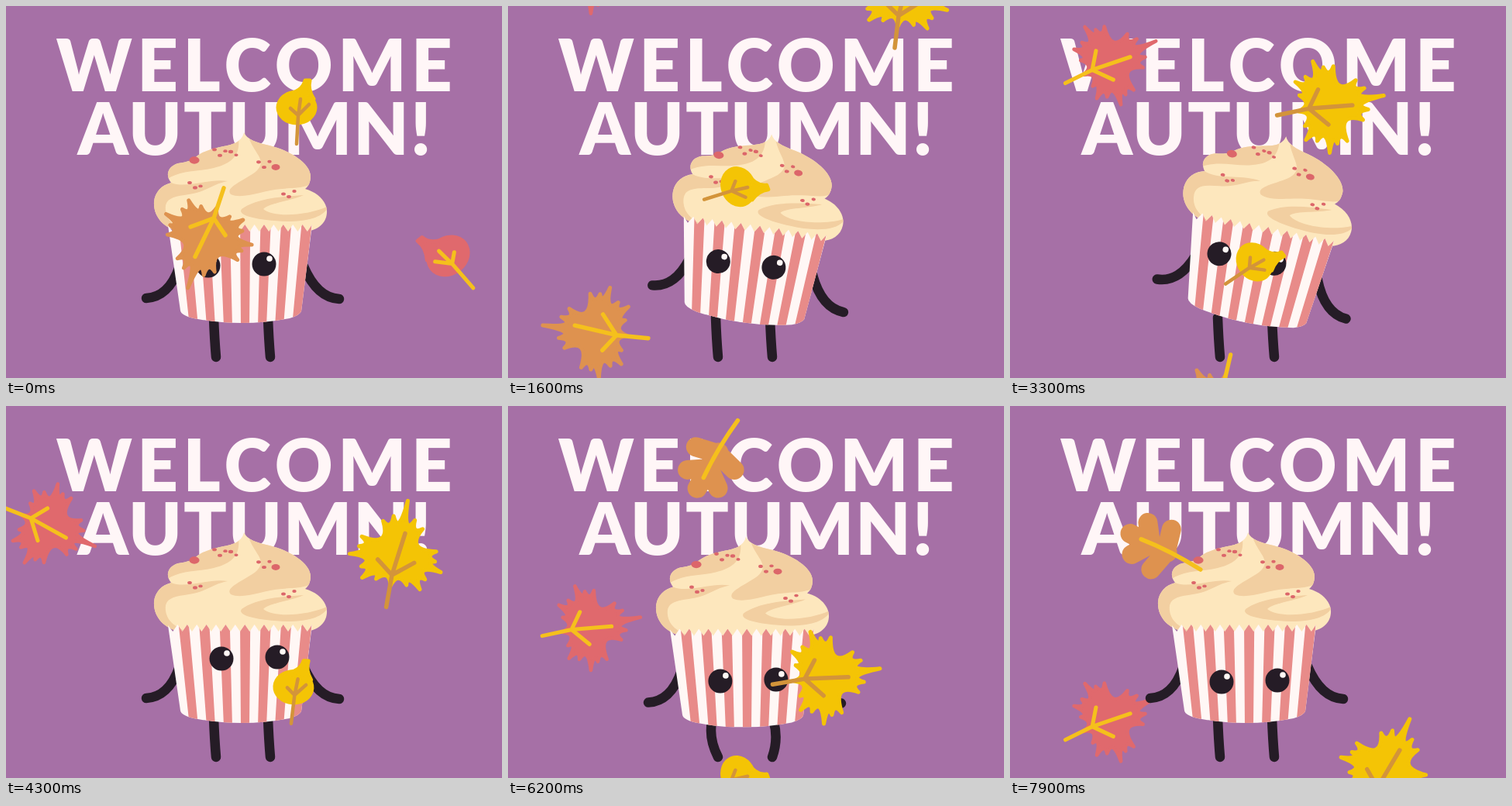
Write an HTML page that moves like this. It is 640x480 px and loops after 8 s.

```html
<!DOCTYPE html>
<html lang="en">
<head>
<meta charset="utf-8">
<title>Welcome Autumn</title>
<style>
  html, body { margin: 0; width: 100%; height: 100%; overflow: hidden; background: #a670a6; }
  svg { display: block; width: 100vw; height: 100vh; }
  text { font: 900 92px Lato, "Open Sans", sans-serif; fill: #fff6f7; text-anchor: middle; }
  .line { fill: none; stroke-linecap: round; stroke-linejoin: round; }
  .limb { fill: none; stroke: #251c26; stroke-width: 12.5; stroke-linecap: round; }
  .leaf { stroke-linejoin: round; }
  .yellow { fill: #f4c405; stroke: #f4c405; }
  .orange { fill: #de924f; stroke: #de924f; }
  .rose { fill: #e0696d; stroke: #e0696d; }
  .goldRib { stroke: #f5c01c; }
  .brownRib { stroke: #d3943a; }
</style>
</head>
<body>
<svg viewBox="0 0 640 480">
  <defs>
    <path id="maple" stroke-width="5"/>
    <path id="mapleRib" class="line" stroke-width="5.5" d="M0 0L42-1 98 5M58-23L42-1 63 24"/>
    <g id="drop">
      <ellipse cy="-1" rx="26.5" ry="22.5" stroke="none"/>
      <path stroke-width="5" d="M-12-18Q8-22 11-36L17-36Q14-24 22-12Z"/>
    </g>
    <path id="dropRib" class="line" stroke-width="4.5" d="M0 46L2 10 5-12M-8 0L2 9 16-5"/>
    <path id="oak" class="line" stroke-width="25" d="M48 0H102M50 0L57-29M50 0L57 29M72 0L88-23M72 0L88 23"/>
    <path id="oakRib" class="line" stroke-width="5.5" d="M0 0Q45 4 86 0"/>
    <clipPath id="cupClip"><path id="cupEdge"/></clipPath>
    <clipPath id="creamClip"><path id="cream" d="M307 163C311 172 322 176 340 180C368 187 392 203 393 219C393 228 390 233 386 236C404 241 415 254 414 267C413 283 398 292 380 291L225 291C204 287 190 272 191 253C192 240 201 231 213 228C205 218 209 207 222 203C236 201 240 199 246 194C262 181 292 182 300 174C305 170 306 167 307 163Z"/></clipPath>
  </defs>

  <rect width="640" height="480" fill="#a670a6"/>
  <text x="323.5" y="110" letter-spacing="6.5">WELCOME</text>
  <text x="321.5" y="192" letter-spacing="2">AUTUMN!</text>

  <g id="red" class="leaf rose"><g transform="scale(.92) translate(-75)"><use href="#maple"/><use href="#mapleRib" class="goldRib"/></g></g>

  <path id="legs" class="limb"/>

  <g id="body">
    <path class="limb" d="M224 336C214 364 200 376 181 377M384 336C396 364 411 377 430 378"/>
    <use href="#cream" fill="#fde7bd"/>
    <g clip-path="url(#creamClip)" fill="#f2cfa1">
      <path d="M300 172C302 190 294 203 268 209C248 214 226 211 207 224L205 200 250 180Z"/>
      <path d="M314 172C322 192 338 200 322 214C306 226 282 234 290 243C306 250 330 238 356 236C376 234 386 235 396 228L398 190 340 172Z"/>
      <path d="M213 228C232 236 262 222 286 226C268 229 258 240 236 243C216 246 204 248 206 264C208 279 220 285 232 291L190 291 184 240Z"/>
      <path d="M304 262C322 249 352 246 384 244C366 252 340 254 332 262C346 274 392 270 416 258C410 276 376 280 346 277C322 275 298 270 304 262Z"/>
    </g>
    <g id="sprinkles" fill="#dc666a"></g>
    <g clip-path="url(#cupClip)"><rect x="200" y="275" width="200" height="140" fill="#fff7f5"/><path id="stripes" fill="#e88b89"/></g>
    <g id="eyes">
      <g id="eye"><circle r="15.5" fill="#251c26"/><circle cx="7" cy="-7" r="3.8" fill="#fff7f5"/></g>
      <use href="#eye" x="72" y="-2"/>
    </g>
  </g>

  <g id="gold" class="leaf yellow"><g transform="translate(-75)"><use href="#maple"/><use href="#mapleRib" class="brownRib"/></g></g>
  <g id="pink" class="leaf rose"><g transform="scale(-1.12 1.12)"><use href="#drop"/><use href="#dropRib" class="goldRib"/></g></g>
  <g id="amber" class="leaf orange"><g transform="scale(.98) translate(-75)"><use href="#maple"/><use href="#mapleRib" class="goldRib"/></g></g>
  <g id="lemon" class="leaf yellow"><use href="#drop"/><use href="#dropRib" class="brownRib"/></g>
  <g id="brown" class="leaf orange"><g transform="translate(-70)"><use href="#oak"/><use href="#oakRib" class="goldRib"/></g></g>
</svg>

<script>
const LOOP = 8000, STEP = 100;
const $ = id => document.getElementById(id);

// Each leaf sways around x and falls from y, both taken at its rightmost point (time "peak").
// speed is in px/s, dip is the extra drop per swing, beat the dips per swing.
const leaf = (x, sway, y, speed, dip, turn, swing, peak, period = 4600, beat = 1) =>
  ({ x, sway, y, speed, dip, turn, swing, peak, period, beat });
const leaves = {
  lemon: leaf(325, 50, 132, 53, 25, 44, -44, 0, 4600, 2),
  amber: leaf(202, 94, 255, 66, 13, 138, -49, -700),
  gold: leaf(460, 50, -24, 76, 20, -43, -39, 1550, 2950),
  pink: leaf(565, 40, 420, 215, 0, -36, -12, 450, 2000),
  red: leaf(100, 59, 15, 72, 24, -3, -38, 2600),
  brown: leaf(222, 42, 49, 113, -100, 164, -47, 5900)
};

function ramp(t, from, to) {
  const u = Math.min(1, Math.max(0, (t - from) / (to - from)));
  return u * u * (3 - 2 * u);
}

// Half the leaf as tooth tips, mirrored; longer gaps get deeper scallops
function buildMaple() {
  const half = [[28,0],[33,20],[31,38],[45,42],[58,60],[70,50],[83,49],[108,26],[117,14],[140,0]];
  const tips = [...half, ...half.slice(0, -1).reverse().map(([x, y]) => [x, -y])];
  let d = `M${tips[0]}`;
  for (let i = 1; i < tips.length; i++) {
    const [ax, ay] = tips[i - 1], [bx, by] = tips[i];
    const mx = (ax + bx) / 2, my = (ay + by) / 2;
    const pull = Math.hypot(bx - ax, by - ay) / 45;
    d += `Q${mx + (70 - mx) * pull} ${my - my * pull} ${bx} ${by}`;
  }
  $("maple").setAttribute("d", d + "Z");
}

function buildCup() {
  const left = 209, width = 186, teeth = 15, bands = 14;
  let edge = `M${left} 283`, bars = "";
  for (let i = 0; i < teeth; i++)
    edge += `L${left + (i + .5) * width / teeth} 291L${left + (i + 1) * width / teeth} 282`;
  $("cupEdge").setAttribute("d", edge + "L381 394Q379 399 366 403Q304 415 242 403Q226 399 225 393Z");
  const top = k => left + k * width / bands, low = k => 226 + k * 11;
  for (let i = 1; i < bands; i += 2)
    bars += `M${top(i)} 278H${top(i + 1)}L${low(i + 1)} 414H${low(i)}Z`;
  $("stripes").setAttribute("d", bars);
}

function buildSprinkles() {
  const dot = (x, y, r) => `<ellipse cx="${x}" cy="${y}" rx="${r * 1.2}" ry="${r * .85}"/>`;
  let dots = dot(243, 199, 5.5) + dot(348, 208, 4.6);
  for (const [x, y, count] of [[269, 189, 5], [326, 204, 3], [237, 232, 3], [358, 243, 3]])
    for (let i = 0; i < count; i++)
      dots += dot(x + i * 7, y + 4 * Math.sin(i * 2.4 + x), 2.4 + .5 * Math.sin(i * 3));
  $("sprinkles").innerHTML = dots;
}

function drawLeaf(id, t) {
  const l = leaves[id], phase = 2 * Math.PI * (t - l.peak) / l.period;
  const x = l.x + l.sway * Math.cos(phase);
  const y = l.y + l.speed * (t - l.peak) / 1000 + l.dip * Math.sin(l.beat * phase / 2) ** 2;
  $(id).setAttribute("transform", `translate(${x} ${y}) rotate(${l.turn + l.swing * Math.cos(phase)})`);
}

function draw(t) {
  for (const id in leaves) drawLeaf(id, t);

  const tilt = 11.6 * (ramp(t, 0, 2600) - ramp(t, 3300, 4300));
  const squat = 7 * (ramp(t, 4300, 5500) - ramp(t, 5500, 7900));
  $("body").setAttribute("transform", `translate(0 ${squat}) rotate(${tilt} 306 408)`);

  const eyeX = 261 - 8 * ramp(t, 1600, 3300) + 25 * ramp(t, 3300, 4300) - 5 * ramp(t, 4300, 6900);
  const eyeY = 335 - 9 * ramp(t, 1600, 4300) + 30 * ramp(t, 4600, 6900);
  $("eyes").setAttribute("transform", `translate(${eyeX} ${eyeY})`);

  const bend = squat * 1.8, hip = squat * .9, top = 402 + squat;
  $("legs").setAttribute("d",
    `M${268 - hip} ${top}Q${269 - bend} 430 271 453M${338 + hip} ${top}Q${339 + bend} 430 341 453`);
}

function tick(now) {
  draw(Math.floor(now % LOOP / STEP) * STEP);
  requestAnimationFrame(tick);
}

buildMaple();
buildCup();
buildSprinkles();
requestAnimationFrame(tick);
</script>
</body>
</html>
```
